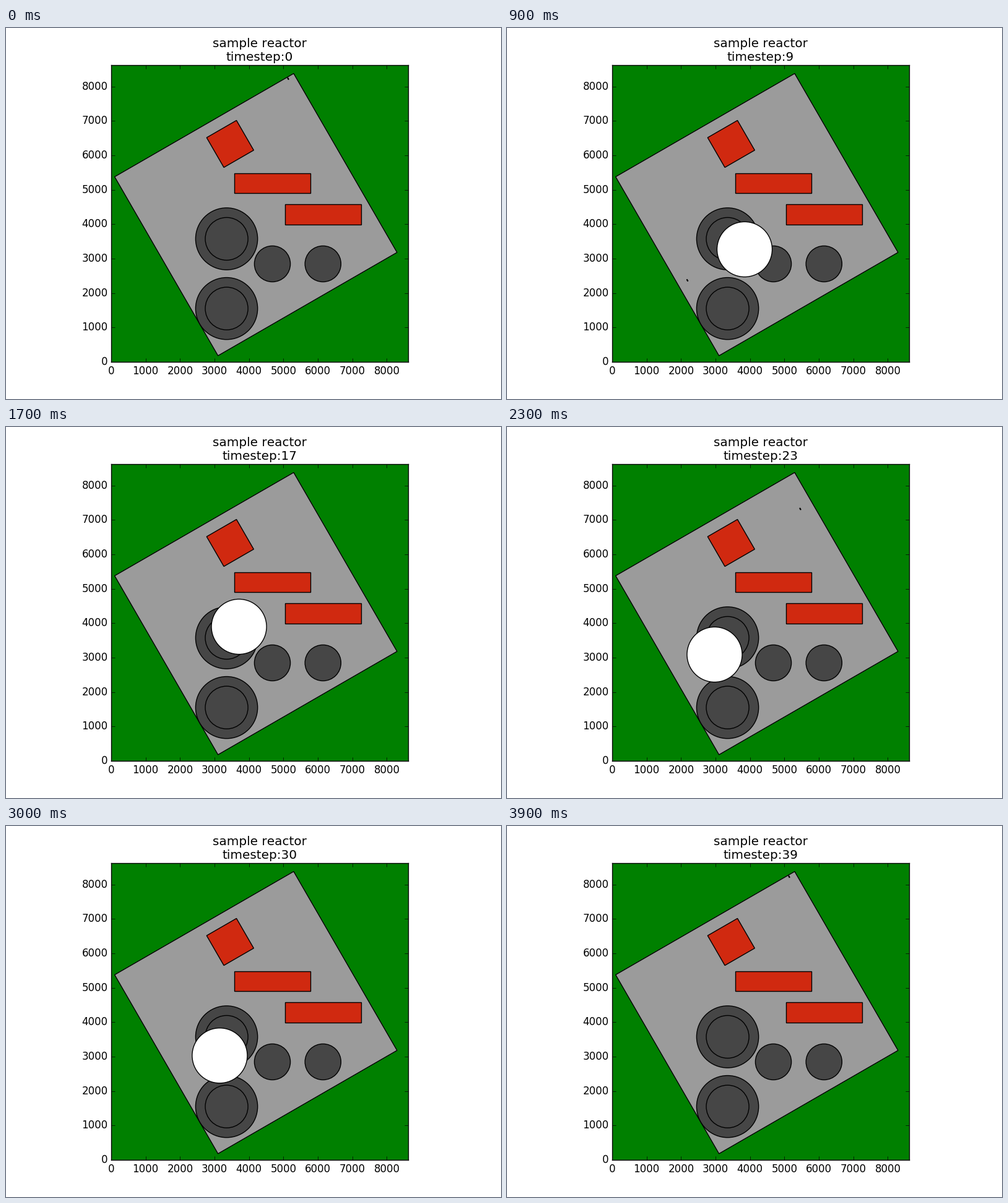
Recreate the animation shown at these times as a matplotlib script. Size 800x600 px, loop 4 s.

```python
import numpy as np
import matplotlib.pyplot as plt
from matplotlib.animation import FuncAnimation
from matplotlib.patches import Circle, Rectangle

FRAMES, INTERVAL = 40, 100
SIZE = 8620
GREY, DARK, RED = "#9b9b9b", "#464646", "#d02910"

plt.rcParams.update({
    "font.family": "DejaVu Sans",
    "font.size": 12,
    "text.kerning_factor": 6,
    "axes.linewidth": 1.0,
    "axes.titlesize": 14.4,
    "axes.titlepad": 5,
    "ytick.alignment": "center",
})

# Stops by timestep; the speck passes under the disc three times
CORNER = (5136, 8225)
DISC = {1: (5940, 5930), 9: (3843, 3269), 17: (3709, 3897), 23: (2972, 3089),
        30: (3150, 3030), 34: (3601, 2936), 36: (3270, 3915)}
SPECK = {0: CORNER, 9: (2182, 2370), 17: DISC[17], 23: (5459, 7318),
         30: DISC[30], 34: DISC[34], FRAMES - 1: CORNER}


def position(stops, step):
    times = list(stops)
    return [np.interp(step, times, axis) for axis in zip(*stops.values())]


fig = plt.figure(figsize=(8, 6), dpi=100, facecolor="white")
ax = fig.add_axes([170 / 800, 0.1, 0.6, 0.8], facecolor="#008000")
ax.set(xlim=(0, SIZE), ylim=(0, SIZE))
ticks = range(0, SIZE, 1000)
ax.set_xticks(ticks)
ax.set_yticks(ticks)
ax.tick_params(direction="in", length=4, width=0.5, pad=4, top=True, right=True)


def add(patch, color, z=1):
    patch.set(facecolor=color, edgecolor="black", linewidth=1, zorder=z)
    return ax.add_patch(patch)


# Floor and fixed equipment
add(Rectangle((3100, 180), 6000, 6000, angle=30), GREY)
add(Rectangle((3270, 5648), 1000, 1000, angle=30), RED)
add(Rectangle((3575, 4894), 2209, 575), RED)
add(Rectangle((5050, 3980), 2209, 595), RED)
for y in (3574, 1550):
    for radius in (900, 620):
        add(Circle((3350, y), radius), DARK)
for x in (4678, 6147):
    add(Circle((x, 2847), 522), DARK)

# Moving parts
speck = add(Rectangle((0, 0), 15, 50, angle=30, rotation_point="center"), "black", 1.2)
disc = add(Circle((0, 0), 800), "white", 1.3)
title = ax.set_title("")


def draw(step):
    x, y = position(SPECK, step)
    speck.set_xy((x - 7.5, y - 25))
    disc.center = position(DISC, step)
    disc.set_visible(min(DISC) <= step <= max(DISC))
    title.set_text(f"sample reactor\ntimestep:{step}")
    return speck, disc, title


anim = FuncAnimation(fig, draw, frames=FRAMES, interval=INTERVAL,
                     init_func=lambda: draw(0), repeat=True, repeat_delay=0)
plt.show()
```
